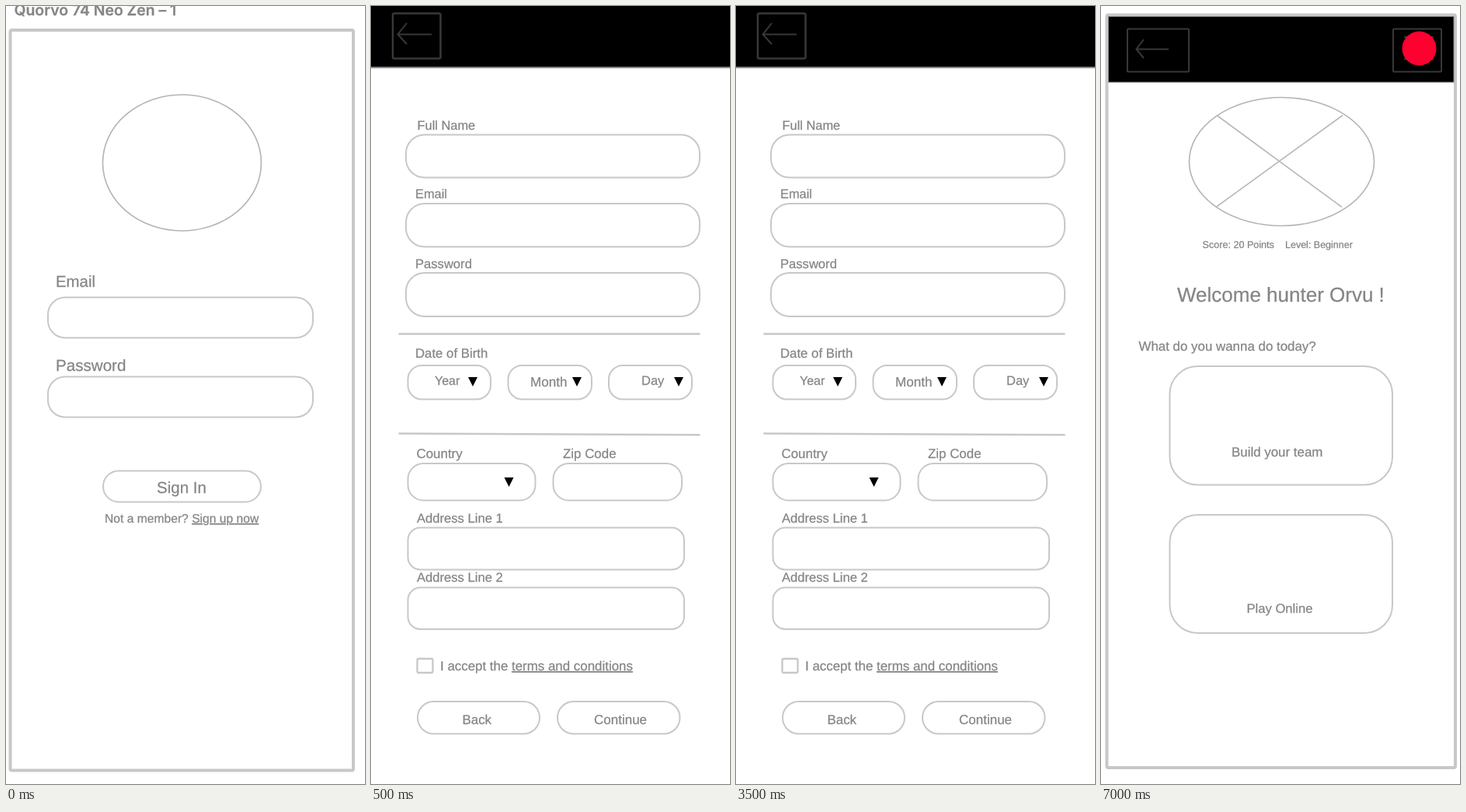
Write an HTML page that moves like this. It is 462 by 1000 pixels and loops after 8000 ms.

```html
<!DOCTYPE html>
<html lang="en">
<head>
<meta charset="utf-8">
<title>App wireframes</title>
<style>
  html, body { margin: 0; height: 100%; overflow: hidden; background: #fff; }
  svg { display: block; width: 100vw; height: 100vh; }
  text { font-family: "Liberation Sans", Arial, sans-serif; fill: #858585; stroke: #858585; stroke-width: .25; white-space: pre; text-rendering: geometricPrecision; }
  .title { font-family: Inter, sans-serif; font-weight: 600; }
  .link { text-decoration: underline; text-decoration-thickness: 1px; }
</style>
</head>
<body>
<svg id="stage" viewBox="0 0 462 1000"></svg>
<script>
const GREY = '#c8c8c8', DARK = '#383838';

// Shapes are placed by the centre lines of their strokes.
const box = (x1, y1, x2, y2, r = 0, width = 2, stroke = GREY, fill = 'none') =>
  `<rect x="${x1}" y="${y1}" width="${x2 - x1}" height="${y2 - y1}" rx="${r}" fill="${fill}" stroke="${stroke}" stroke-width="${width}"/>`;
const path = (d, width = 2, stroke = GREY) =>
  `<path d="${d}" fill="none" stroke="${stroke}" stroke-width="${width}"/>`;
const oval = (x, y, rx, ry) =>
  `<ellipse cx="${x}" cy="${y}" rx="${rx}" ry="${ry}" fill="none" stroke="#b4b4b4" stroke-width="1.6"/>`;
const text = (x, y, size, words, style = '') =>
  `<text x="${x}" y="${y}" font-size="${size}" class="${style}">${words}</text>`;
const link = words => `<tspan class="link">${words}</tspan>`;
const arrow = (x, y) => `<path d="M${x - 6} ${y - 6}h12l-6 12z" fill="#000"/>`;

const signIn = [
  text(10.5, 12, 19.4, 'Quorvo 74 Neo Zen – 1', 'title'),
  box(5.5, 31, 447, 982.5, 2, 4),
  oval(226.5, 201.5, 102, 87.5),
  text(64, 360.5, 20.4, 'Email'),
  box(54, 374.5, 395, 426.5, 22),
  text(64, 468.5, 20.6, 'Password'),
  box(54, 476.5, 395, 528.5, 22),
  box(125, 597.5, 328, 637.5, 20),
  text(194, 625.5, 20.5, 'Sign In'),
  text(127, 664, 15.65, `Not a member? ${link('Sign up now')}`)
];

const signUp = [
  '<path d="M0 0H462V78H0z"/>',
  path('M0 79H462', 2, '#888'),
  box(28, 9.5, 89.5, 67.5, 2, 2.5, DARK),
  path('M78 36.5H35M46 22L34.5 36.5L46 49', 2, DARK),
  text(59.5, 158.5, 16.4, 'Full Name'),
  box(45, 165.5, 423, 220.5, 24),
  text(57, 247, 16.4, 'Email'),
  box(45, 254, 423, 309.5, 24),
  text(57, 337, 16.6, 'Password'),
  box(45, 343, 423, 399, 24),
  path('M35.5 421.5H423.5', 2.5),
  text(57, 451.5, 16.8, 'Date of Birth'),
  box(47.5, 462, 154, 505.5, 18),
  box(176.5, 462, 284, 505.5, 18),
  box(306, 462, 413, 505.5, 18),
  text(82, 487, 16, 'Year'),
  text(205, 489, 17.1, 'Month'),
  text(348, 487, 16.5, 'Day'),
  arrow(131, 483), arrow(265, 483), arrow(396, 483),
  path('M35.5 549.5L423.5 551.3', 2.5),
  text(58.5, 581, 16.9, 'Country'),
  text(247, 581, 16.9, 'Zip Code'),
  box(47.5, 588, 211.5, 635.5, 20),
  box(234.5, 588, 400, 635.5, 20),
  arrow(177.5, 612),
  text(59, 663.5, 16.6, 'Address Line 1'),
  box(47.5, 670.5, 403, 724.5, 16),
  text(59, 740, 16.6, 'Address Line 2'),
  box(47.5, 747.5, 403, 801, 16),
  box(59.5, 839, 79.5, 857, 2, 2.3),
  text(89, 854, 16.9, `I accept the ${link('terms and conditions')}`),
  box(60, 894, 217, 935.5, 20.7),
  box(240, 894, 397.5, 935.5, 20.7),
  text(117.5, 922.5, 16.9, 'Back'),
  text(287, 922.5, 17, 'Continue')
];

const home = [
  box(7.5, 11.5, 456, 979, 2, 4),
  box(9.5, 13.5, 454, 98, 0, 1, '#888', '#000'),
  box(34, 29.5, 113, 84.5, 1, 2, DARK),
  path('M87 55.5H46M55 43L45.5 55.5L55 67', 2, DARK),
  box(376, 29.5, 438, 84.5, 1, 2, DARK),
  path('M390 40H428M390 54H428M390 68H428', 2, DARK),
  '<circle cx="409.5" cy="54.5" r="22" fill="#ff0030"/>',
  oval(232.5, 200, 119, 82.5),
  path('M149 140.5L310 258.5M311 140.5L148 258.5', 1.6, '#b8b8b8'),
  text(130.5, 311, 12.6, 'Score: 20 Points'),
  text(237, 311, 12.5, 'Level: Beginner'),
  text(98, 380, 26, 'Welcome hunter Orvu !'),
  text(48.5, 443, 16.9, 'What do you wanna do today?'),
  box(88.5, 463, 375, 615.5, 36),
  text(168, 579, 16.9, 'Build your team'),
  box(88.5, 654, 375, 806, 36),
  text(187.5, 780, 16.6, 'Play Online')
];

const stage = document.getElementById('stage');
stage.innerHTML = [signIn, signUp, home].map(parts => `<g>${parts.join('')}</g>`).join('');
const screens = [...stage.children];
const LOOP = 8000;
const start = performance.now();

function draw(now) {
  const t = Math.max(0, now - start) % LOOP;
  const current = t < 500 ? 0 : t < 5500 ? 1 : 2;
  screens.forEach((screen, i) => screen.style.display = i === current ? '' : 'none');
  requestAnimationFrame(draw);
}
draw(start);
</script>
</body>
</html>
```
